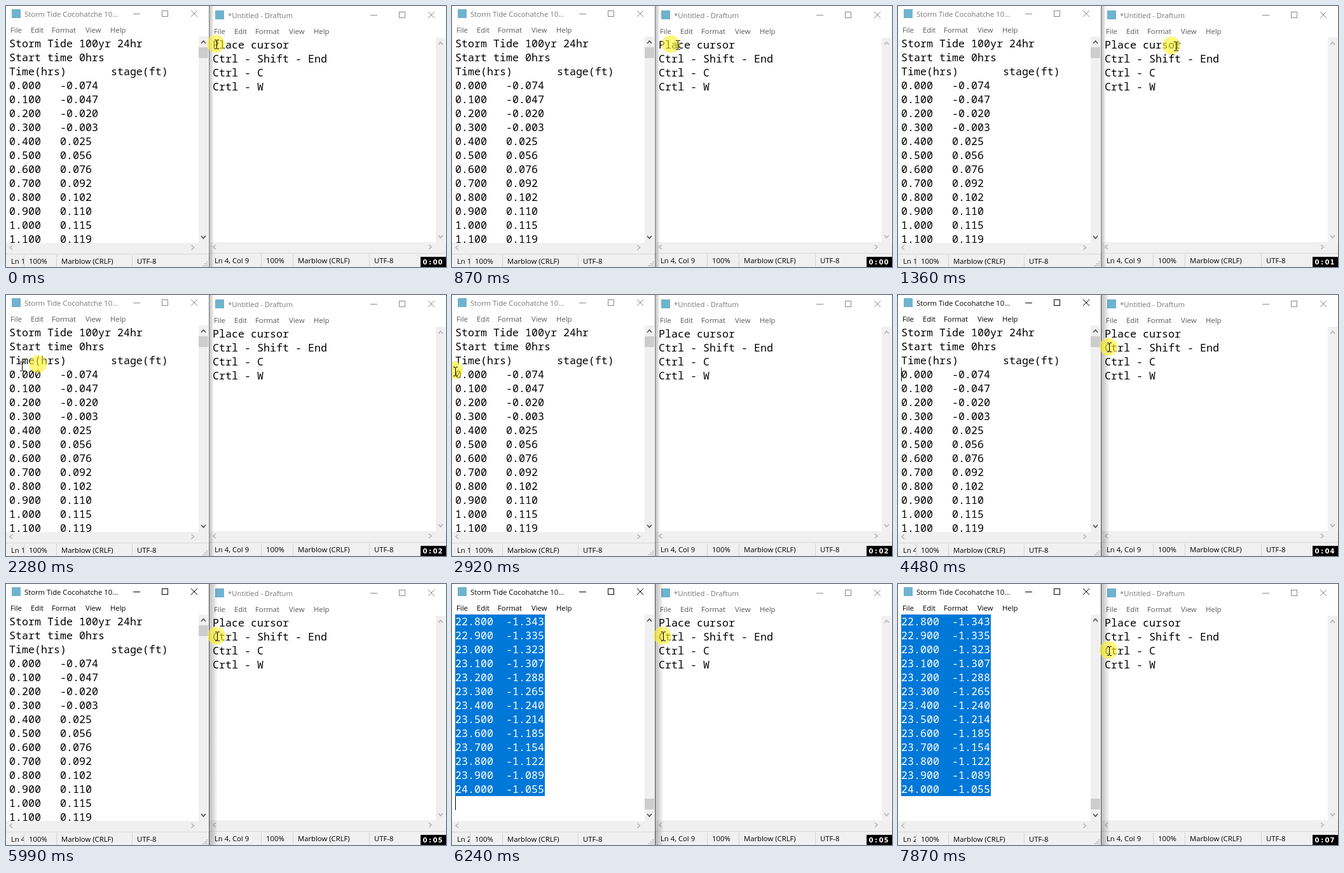
An HTML page with a canvas that plays this animation: 692x411 px, repeating every 8000 ms.

```html
<!DOCTYPE html>
<html lang="en">
<head>
<meta charset="utf-8">
<title>Selecting text to the end of a file</title>
<style>
html, body { margin: 0; width: 692px; height: 411px; overflow: hidden; background: #fff; }
canvas { display: block; }
</style>
</head>
<body>
<canvas id="stage" width="692" height="411"></canvas>
<script>
const g = document.getElementById('stage').getContext('2d');
const LOOP = 8000, ROW = 22, ACTIVATE = 3290, SELECT = 6240;
const SECOND = 1045, BLINK = 535, LEAD = 65;
const UI = '11.3px "Open Sans", "Noto Sans", sans-serif';
const MONO = '16.667px "Noto Sans Mono", "DejaVu Sans Mono", monospace';
const CLOCK = 'bold 10px "DejaVu Sans", sans-serif';

const levels = '-0.074 -0.047 -0.020 -0.003 0.025 0.056 0.076 0.092 0.102 0.110 0.115 0.119';
const tail = '-1.343 -1.335 -1.323 -1.307 -1.288 -1.265 -1.240 -1.214 -1.185 -1.154 -1.122 -1.089 -1.055';
const rows = (values, start) =>
  values.split(' ').map((v, i) => (start + i / 10).toFixed(3).padEnd(8) + v);
const headLines = ['Storm Tide 100yr 24hr', 'Start time 0hrs', 'Time(hrs)       stage(ft)', ...rows(levels, 0)];
const tailLines = rows(tail, 22.8);
const steps = ['Place cursor', 'Ctrl - Shift - End', 'Ctrl - C', 'Crtl - W'];

const smooth = u => u * u * (3 - 2 * u);
const easeOut = u => u * (2 - u);
const home = { x: 330, y: 59.5 };
const moves = [
  { from: 690, to: 1490, x: 437.5, y: 62.5, ease: smooth },
  { from: 1880, to: 2480, x: 2.5, y: 114.5, ease: easeOut },
  { from: 2500, to: 3290, x: 4, y: 122, ease: smooth },
  { from: 3420, to: 3880, x: 313, y: 83, ease: smooth },
  { from: 3900, to: 4330, x: 331, y: 81.5, ease: smooth },
  { from: 7100, to: 7450, x: 324.5, y: 90.5, ease: smooth },
  { from: 7580, to: 7870, x: 331, y: 104, ease: smooth }
];

function haloAt(t) {
  let { x, y } = home;
  for (const m of moves) {
    const u = Math.min(1, Math.max(0, (t - m.from) / (m.to - m.from)));
    x += (m.x - x) * m.ease(u);
    y += (m.y - y) * m.ease(u);
  }
  return { x, y };
}

function box(x, y, w, h, color) {
  g.fillStyle = color;
  g.fillRect(x, y, w, h);
}

function text(s, x, y, font, color) {
  g.font = font;
  g.fillStyle = color;
  g.fillText(s, x, y);
}

function line(color, width, ...pts) {
  g.strokeStyle = color;
  g.lineWidth = width;
  g.beginPath();
  pts.forEach(([x, y], i) => i ? g.lineTo(x, y) : g.moveTo(x, y));
  g.stroke();
}

function clipped(x, y, w, h, draw) {
  g.save();
  g.beginPath();
  g.rect(x, y, w, h);
  g.clip();
  draw();
  g.restore();
}

// Arrow head at (x, y) pointing along (dx, dy).
function chevron(x, y, dx, dy, color) {
  const tip = 2, arm = 3.5;
  line(color, 1.6, [x - dx * tip + dy * arm, y - dy * tip + dx * arm],
    [x + dx * tip, y + dy * tip],
    [x - dx * tip - dy * arm, y - dy * tip - dx * arm]);
}

function titleBar(x, y, title, close, active) {
  const c = active ? '#000' : '#8a8a8a';
  box(x + 9, y + 5, 14, 14, '#6fb3cf');
  text(title, x + 29, y + 17, UI, active ? '#000' : '#777');
  box(close - 91, y + 12, 11, 1, c);
  g.strokeStyle = c;
  g.lineWidth = 1;
  g.strokeRect(close - 45.5, y + 7.5, 9, 9);
  line(c, 1, [close, y + 7], [close + 10, y + 17]);
  line(c, 1, [close + 10, y + 7], [close, y + 17]);
  [['File', 7], ['Edit', 39], ['Format', 72], ['View', 125], ['Help', 164]].forEach(
    ([name, dx]) => text(name, x + dx, y + 42, UI, active ? '#000' : '#595959'));
}

function statusBar(x, y, w, place, cols) {
  box(x, y, w, 411 - y, '#f0f0f0');
  box(x, y, w, 1, '#d9d9d9');
  clipped(x, y, cols[0] - 8 - x, 22, () => text(place, x + 8, y + 16, UI, '#000'));
  ['100%', 'Marblow (CRLF)', 'UTF-8'].forEach((s, i) => {
    box(cols[i] - 8, y + 2, 1, 20, '#d4d4d4');
    text(s, cols[i], y + 16, UI, '#000');
  });
}

function caretOn(t) {
  const since = t >= SELECT ? SELECT : ACTIVATE;
  return t >= since && Math.floor((t - since) / BLINK) % 2 === 0;
}

function leftWindow(t) {
  const active = t >= ACTIVATE, selected = t >= SELECT;
  box(0, 0, 319, 411, '#fff');
  titleBar(0, 0, 'Storm Tide Cocohatche 10...', 291, active);
  clipped(0, 47, 303, 326, () => {
    if (selected) box(5, 48, 141, tailLines.length * ROW, '#0078d7');
    (selected ? tailLines : headLines).forEach(
      (s, i) => text(s, 5, 65 + i * ROW, MONO, selected ? '#fff' : '#000'));
    if (caretOn(t)) box(5, selected ? 334 : 114, 1, ROW, '#000');
  });
  box(303, 48, 15, 325, '#f0f0f0');
  box(303, selected ? 338 : 65, 15, 17, '#cdcdcd');
  chevron(310.5, 57, 0, -1, '#505050');
  chevron(310.5, 364, 0, 1, '#505050');
  box(0, 373, 318, 17, '#f0f0f0');
  chevron(8, 380.5, -1, 0, '#b4b4b4');
  chevron(293.5, 380.5, 1, 0, '#b4b4b4');
  const row = selected ? 245 : active ? 4 : 1;
  statusBar(0, 390, 319, `Ln ${row}, Col 1`, [36, 87, 206]);
  for (let i = 0; i < 3; i++)
    for (let j = 0; j <= i; j++) box(315 - j * 3, 402 + i * 3, 2, 2, '#bdbdbd');
  box(319, 0, 1, 411, active ? '#4c4c4c' : '#7b7b7b');
}

function rightWindow(active) {
  box(320, 0, 372, 411, '#fff');
  titleBar(320, 2, '*Untitled - Draftum', 664, false);
  steps.forEach((s, i) => text(s, 325, 67 + i * ROW, MONO, '#000'));
  box(676, 50, 15, 322, '#f0f0f0');
  chevron(683.5, 59, 0, -1, '#b4b4b4');
  chevron(683.5, 363, 0, 1, '#b4b4b4');
  box(321, 372, 371, 17, '#f0f0f0');
  chevron(328, 379.5, -1, 0, '#b4b4b4');
  chevron(667, 379.5, 1, 0, '#b4b4b4');
  statusBar(320, 389, 372, 'Ln 4, Col 9', [409, 459, 579]);
  const reach = active ? 13 : 7;
  const shade = g.createLinearGradient(320, 0, 320 + reach, 0);
  shade.addColorStop(0, 'rgba(0,0,0,.26)');
  shade.addColorStop(1, 'rgba(0,0,0,0)');
  box(320, 0, reach, 411, shade);
}

// The halo trails a little behind the I-beam.
function pointer(t) {
  const halo = haloAt(t), beam = haloAt(t + LEAD);
  g.fillStyle = 'rgba(255,242,40,.62)';
  g.beginPath();
  g.arc(halo.x, halo.y, 14, 0, Math.PI * 2);
  g.fill();
  const x = Math.floor(beam.x + 1.5), y = Math.round(beam.y + .5);
  box(x, y - 6, 1, 13, '#000');
  for (const end of [y - 7, y + 7]) {
    box(x - 3, end, 3, 1, '#000');
    box(x + 1, end, 3, 1, '#000');
  }
}

function clock(t) {
  box(652, 395, 40, 16, '#000');
  g.textAlign = 'center';
  [...`0:0${Math.floor(t / SECOND)}`].forEach(
    (c, i) => text(c, 659 + i * 8, 406.5, CLOCK, '#fff'));
  g.textAlign = 'left';
}

function frame(now) {
  const t = now % LOOP;
  rightWindow(t >= ACTIVATE);
  leftWindow(t);
  pointer(t);
  clock(t);
  requestAnimationFrame(frame);
}
frame(performance.now());
</script>
</body>
</html>
```
